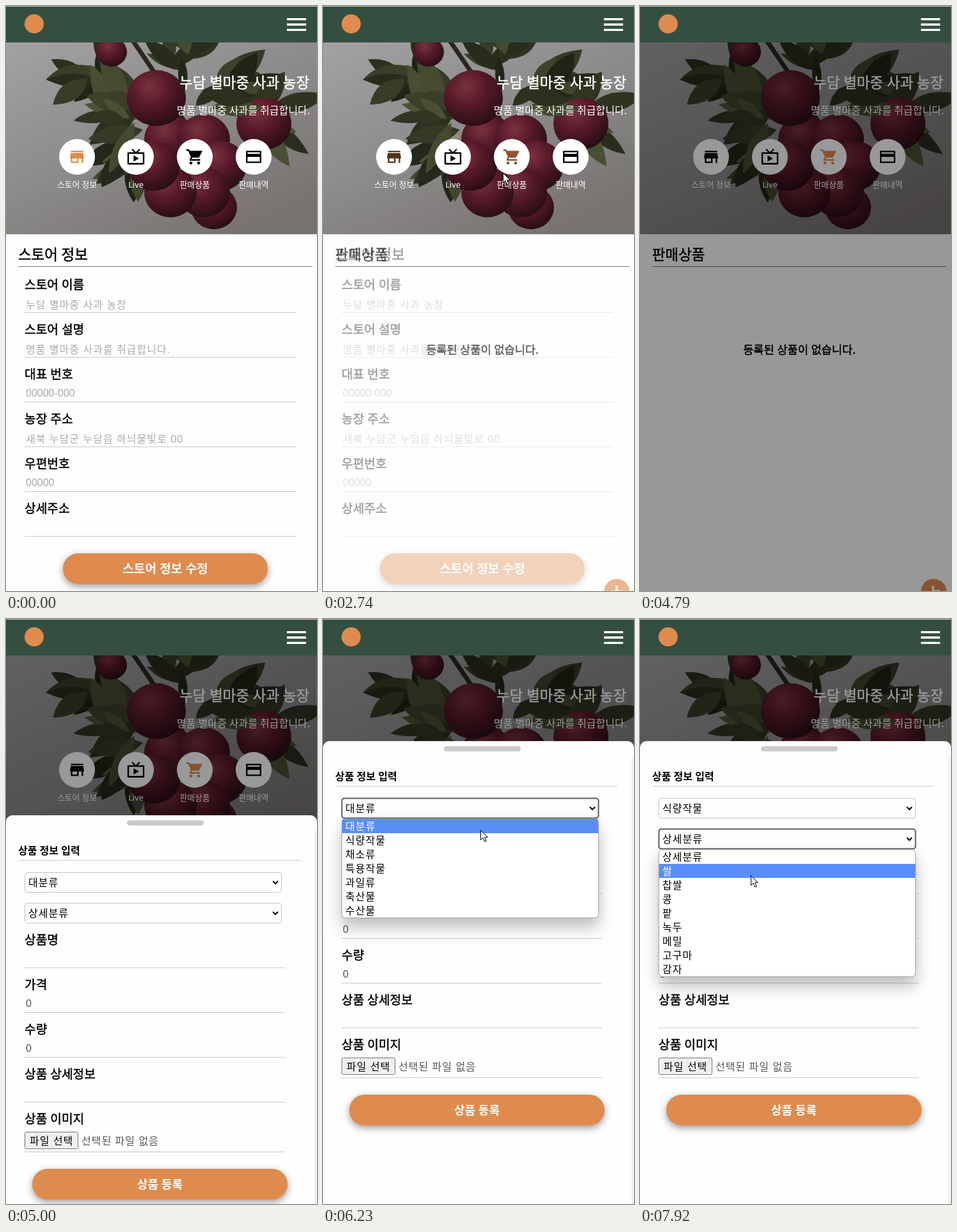
An HTML page that plays this animation: 486 px wide and 915 px high, repeating every 7.99 s.

```html
<!DOCTYPE html>
<html lang="ko">
<head>
<meta charset="utf-8">
<title>스토어 관리</title>
<style>
  html, body { margin: 0; width: 100%; height: 100%; overflow: hidden; background: #fefefe; }
  svg { display: block; width: 486px; height: 915px; }
  text { font-family: "Noto Sans", "Noto Sans CJK KR", "Noto Sans CJK", sans-serif; white-space: pre; }
  .field { font-family: "Liberation Sans", "Noto Sans CJK KR", "Noto Sans CJK", sans-serif; }
  .hangul { letter-spacing: 1px; }
  .medium { stroke: #000; stroke-width: .45px; }
  .light { fill: #fff; }
  .light.medium { stroke: #fff; }
  .raised { filter: drop-shadow(0 4px 6px rgba(0,0,0,.4)); }
  .list { filter: drop-shadow(0 14px 12px rgba(0,0,0,.26)); }
</style>
</head>
<body>
<svg id="stage" viewBox="0 0 486 915"></svg>
<script>
const LOOP = 7990;
const ORANGE = '#df8b4e';
const stage = document.getElementById('stage');

// ---------- drawing helpers ----------
const range = n => [...Array(n).keys()];
const text = (x, middle, size, str, attrs = '') =>
  `<text x="${x}" y="${middle + size * 0.37}" font-size="${size}" ${attrs}>${str}</text>`;
const isHangul = str => /[가-힣]/.test(str);
const field = (x, middle, str, fill = '#000') =>
  text(x, middle, 16, str, `fill="${fill}" class="field ${isHangul(str) ? 'hangul' : ''}"`);
const title = str => text(19, 389, 22.4, str, 'class="medium"');
const rule = (x1, x2, y, color = '#c9c9c9') => `<path d="M${x1} ${y}H${x2}" stroke="${color}"/>`;
const box = (x, y, w, h, r, attrs) =>
  `<rect x="${x}" y="${y}" width="${w}" height="${h}" rx="${r}" ${attrs}/>`;
const group = (id, body) => `<g id="${id}">${body}</g>`;
const button = (x, y, w, size, str) => box(x, y, w, 48, 24, `fill="${ORANGE}" class="raised"`) +
  text(x + w / 2, y + 24, size, str, 'class="light" font-weight="700" text-anchor="middle"');
// Labelled rows 70px apart, each closed by a thin line.
const form = (top, right, fill, rows) => rows.map(([name, value], i) => {
  const y = top + i * 70;
  return text(29, y, 19.2, name, 'class="medium"') +
    field(31, y + (isHangul(value) ? 31 : 29.5), value, fill) + rule(29, right, y + 43.5);
}).join('');

// ---------- hero picture ----------
let seed = 11;
const random = () => (seed = seed * 16807 % 2147483647) / 2147483647;
const between = (a, b) => a + (b - a) * random();

// Leaves fan out from a twig, pointing away from the middle of the tree.
const leaf = (x, y) => {
  const angle = Math.atan2(y - 175, x - 275) * 180 / Math.PI + between(-65, 65);
  const length = between(50, 95);
  const width = length * between(0.25, 0.45);
  const shade = between(11, 27);
  return `<path transform="translate(${x + between(-22, 22)} ${y + between(-18, 18)}) rotate(${angle})"
    fill="hsl(75 22% ${shade}%)" d="M0 0Q${length * 0.4} ${-width} ${length} 0Q${length * 0.5} ${width} 0 0"/>`;
};
const fan = ([x, y], count) => range(count).map(() => leaf(x, y)).join('');
const apple = (x, y, r) => `<ellipse cx="${x}" cy="${y}" rx="${r}" ry="${r * 0.95}" fill="url(#apple)"/>`;
const cluster = range(6).map(i => {
  const angle = (i * 60 - 120) * Math.PI / 180;
  return apple(283 + 52 * Math.cos(angle), 250 + 48 * Math.sin(angle), 41);
}).join('');

const twigs = [[145, 110], [190, 165], [275, 85], [345, 125], [395, 170], [205, 225]];
const hero = `<g clip-path="url(#heroClip)">
  <rect y="57" width="486" height="300" fill="url(#sky)"/>
  <path d="M195 50Q230 100 255 140T310 245" fill="none" stroke="#2c2620" stroke-width="7"/>
  ${twigs.map(twig => fan(twig, 9)).join('')}
  ${apple(165, 72, 24)}${apple(403, 184, 43)}${apple(325, 315, 36)}${cluster}
  ${fan([205, 185], 4)}${fan([300, 150], 4)}${apple(235, 144, 46)}
</g>`;

// ---------- store page: icons on a 24-unit grid ----------
const icons = [
  ['스토어 정보', 'M4 4h16v2H4zM4 7h16l1 5v2h-1v6h-2v-6h-4v6H4v-6H3v-2zM6 14v4h6v-4z', ''],
  ['Live', 'M9 10v8l7-4z', 'M2 7h20v14H2zM7 2l5 5 5-5'],
  ['판매상품', 'M5 4h17l-4.5 9H8.5zM5 20a2 2 0 104 0 2 2 0 10-4 0zm10 0a2 2 0 104 0 2 2 0 10-4 0z', 'M1 3h3l4 9-2 4h13'],
  ['판매내역', 'M3 8h18v4H3z', 'M3 5h18v14H3z']
].map(([name, solid, outline], i) => {
  const x = 111 + i * 92;
  return `<circle cx="${x}" cy="236" r="28" fill="#fff"/>
    <g id="icon${i}" color="#000" transform="translate(${x - 14.4} 221.6) scale(1.2)">
      <path d="${solid}" fill="currentColor" fill-rule="evenodd"/>
      <path d="${outline}" fill="none" stroke="currentColor" stroke-width="2" stroke-linejoin="round"/></g>` +
    text(x, 279, 12.8, name, 'class="light" text-anchor="middle"');
}).join('');

const infoPage = title('스토어 정보') + form(436, 453, '#a9a9a9', [
  ['스토어 이름', '누담 별마중 사과 농장'], ['스토어 설명', '명품 별마중 사과를 취급합니다.'],
  ['대표 번호', '00000-000'], ['농장 주소', '새북 누담군 누담읍 하늬물빛로 00'],
  ['우편번호', '00000'], ['상세주소', '']
]) + button(89, 856, 320, 19.2, '스토어 정보 수정');

const productPage = title('판매상품') +
  text(249, 537, 17.6, '등록된 상품이 없습니다.', 'class="medium" text-anchor="middle"') +
  `<circle cx="459" cy="916" r="20" fill="${ORANGE}"/>` +
  group('plus', '<path d="M459 907V925M450 916H468" stroke="#fff" stroke-width="3.5"/>');

// ---------- product sheet ----------
const select = (n, y, value) => box(29.5, y + .5, 401, 31, 4, `id="select${n}" fill="#fefefe"`) +
  group(`value${n}`, field(35, y + 16, value)) +
  `<path d="M417 ${y + 14}l4 4 4-4" fill="none" stroke="#000" stroke-width="2"/>`;

const sheet = box(0, 191, 486, 760, 10, 'fill="#fefefe"') +
  box(482, 215, 4, 720, 0, 'fill="#f1f1f1"') + box(189, 199, 120, 8, 4, 'fill="#cbcbcb"') +
  text(19, 246, 16, '상품 정보 입력', 'font-weight="700"') + rule(21, 460, 261.5) +
  select(0, 280, '대분류') + select(1, 328, '상세분류') +
  form(386, 436, '#555', [['상품명', ''], ['가격', '0'], ['수량', '0'], ['상품 상세정보', '']]) +
  text(29, 666, 19.2, '상품 이미지', 'class="medium"') +
  box(29.5, 686.5, 83, 26, 2, 'fill="#efefef" stroke="#767676"') +
  field(37, 700, '파일 선택') + field(118, 700, '선택된 파일 없음', '#555') +
  rule(29, 436, 717.5) + button(41, 744, 399, 18, '상품 등록');

// ---------- option lists ----------
const ROW = 22;
const lists = [
  { top: 313, open: 6010, close: 7180, options: ['대분류', '식량작물', '채소류', '특용작물', '과일류', '축산물', '수산물'] },
  { top: 361, open: 7440, close: LOOP, options: ['상세분류', '쌀', '찹쌀', '콩', '팥', '녹두', '메밀', '고구마', '감자'] }
];
const listMarkup = ({ top, options }, n) => group(`list${n}`,
  box(29.5, top - .5, 401, options.length * ROW + 1, 6, 'fill="#fff" stroke="#a0a0a0" class="list"') +
  `<rect id="mark${n}" x="30" width="400" height="${ROW}" fill="#5a8ef7"/>` +
  options.map((name, i) => group(`option${n}-${i}`, field(35, top + 11 + i * ROW, name, 'inherit'))).join(''));

stage.innerHTML = `<defs>
  <clipPath id="heroClip"><rect y="57" width="486" height="300"/></clipPath>
  <linearGradient id="sky" x2=".75" y2="1">
    <stop stop-color="#a3a2a3"/><stop offset=".5" stop-color="#8d8b8b"/><stop offset="1" stop-color="#777371"/>
  </linearGradient>
  <radialGradient id="apple" cx=".38" cy=".3" r=".75">
    <stop stop-color="#7a3140"/><stop offset=".45" stop-color="#571a28"/><stop offset="1" stop-color="#260d14"/>
  </radialGradient></defs>` + box(0, 0, 486, 915, 0, 'fill="#fefefe"') + hero +
  text(474, 120, 22.4, '누담 별마중 사과 농장', 'class="light medium" text-anchor="end"') +
  text(475, 163, 16, '명품 별마중 사과를 취급합니다.', 'class="light" text-anchor="end"') +
  icons + rule(19, 479, 407.5, '#777') + group('info', infoPage) + group('products', productPage) +
  box(0, 57, 486, 858, 0, 'id="dim"') + group('sheet', sheet) + lists.map(listMarkup).join('') +
  box(0, 0, 486, 57, 0, 'fill="#344f40"') + box(0, 0, 486, 1, 0, 'fill="#c6cac7"') +
  `<circle cx="44" cy="28" r="15" fill="${ORANGE}"/>
  <path d="M439 20.7H469M439 29H469M439 37.3H469" stroke="#fff" stroke-width="3.3"/>` +
  group('cursor', '<path d="M.5 .5V15.5L4 12.2L6.7 18.3L9.2 17.2L6.6 11.3H11.3Z" fill="#fff" stroke="#000"/>');

// ---------- motion ----------
const $ = id => document.getElementById(id);
const progress = (t, start, end) => Math.min(1, Math.max(0, (t - start) / (end - start)));
const easeOut = p => 1 - (1 - p) ** 3;
const smooth = p => p * p * (3 - 2 * p);
const mix = (a, b, p) => a + (b - a) * p;
const show = (id, on) => { $(id).style.display = on ? '' : 'none'; };
const tint = k => `rgb(${[223, 139, 78].map(c => Math.round(c * k))})`;

// The pointer rests at each stop until the next move begins.
const moves = [
  { from: 380, to: 1300, x: 440, y: 39 },
  { from: 1670, to: 2010, x: 281, y: 261 },
  { from: 3420, to: 3970, x: 448, y: 892 },
  { from: 4170, to: 4380, x: 464, y: 925 },
  { from: 5070, to: 5880, x: 290, y: 296 },
  { from: 5950, to: 6230, x: 246, y: 330 },
  { from: 6300, to: 6500, x: 243, y: 366 },
  { from: 6800, to: 6980, x: 243, y: 343 },
  { from: 7180, to: 7440, x: 183, y: 356 },
  { from: 7710, to: 7920, x: 173, y: 401 }
];
const pointerAt = t => moves.reduce(([x, y], move) => {
  const p = smooth(progress(t, move.from, move.to));
  return [mix(x, move.x, p), mix(y, move.y, p)];
}, [425, 915]);

function render(t) {
  const [x, y] = pointerAt(t);
  $('cursor').setAttribute('transform', `translate(${Math.round(x)} ${Math.round(y)})`);

  const swap = smooth(progress(t, 2380, 3000));
  $('info').setAttribute('opacity', 1 - swap);
  $('products').setAttribute('opacity', swap);
  $('icon0').setAttribute('color', tint(1 - swap));
  $('icon2').setAttribute('color', tint(swap));

  $('dim').setAttribute('opacity', 0.4 * progress(t, 4290, 4590));
  $('plus').setAttribute('transform', `rotate(${-10 * progress(t, 4500, 4790)} 459 916)`);
  $('sheet').setAttribute('transform', `translate(0 ${724 * (1 - easeOut(progress(t, 4800, 5240)))})`);
  show('sheet', t > 4800);

  lists.forEach(({ top, open, close, options }, n) => {
    const focused = t >= open - 40 && t < close + 200;
    show(`list${n}`, t >= open && t < close);
    $(`select${n}`).setAttribute('stroke', focused ? '#5c5c5c' : '#c0c0c0');
    $(`select${n}`).setAttribute('stroke-width', focused ? 2 : 1);
    const current = Math.min(options.length - 1, Math.max(0, Math.floor((y - top) / ROW)));
    $(`mark${n}`).setAttribute('y', top + current * ROW);
    options.forEach((_, i) => $(`option${n}-${i}`).setAttribute('fill', i === current ? '#fff' : '#000'));
  });
  $('value0').firstElementChild.textContent = lists[0].options[t < lists[0].close ? 0 : 1];
}

const start = performance.now();
function tick() {
  render((performance.now() - start) % LOOP);
  requestAnimationFrame(tick);
}
tick();
</script>
</body>
</html>
```
